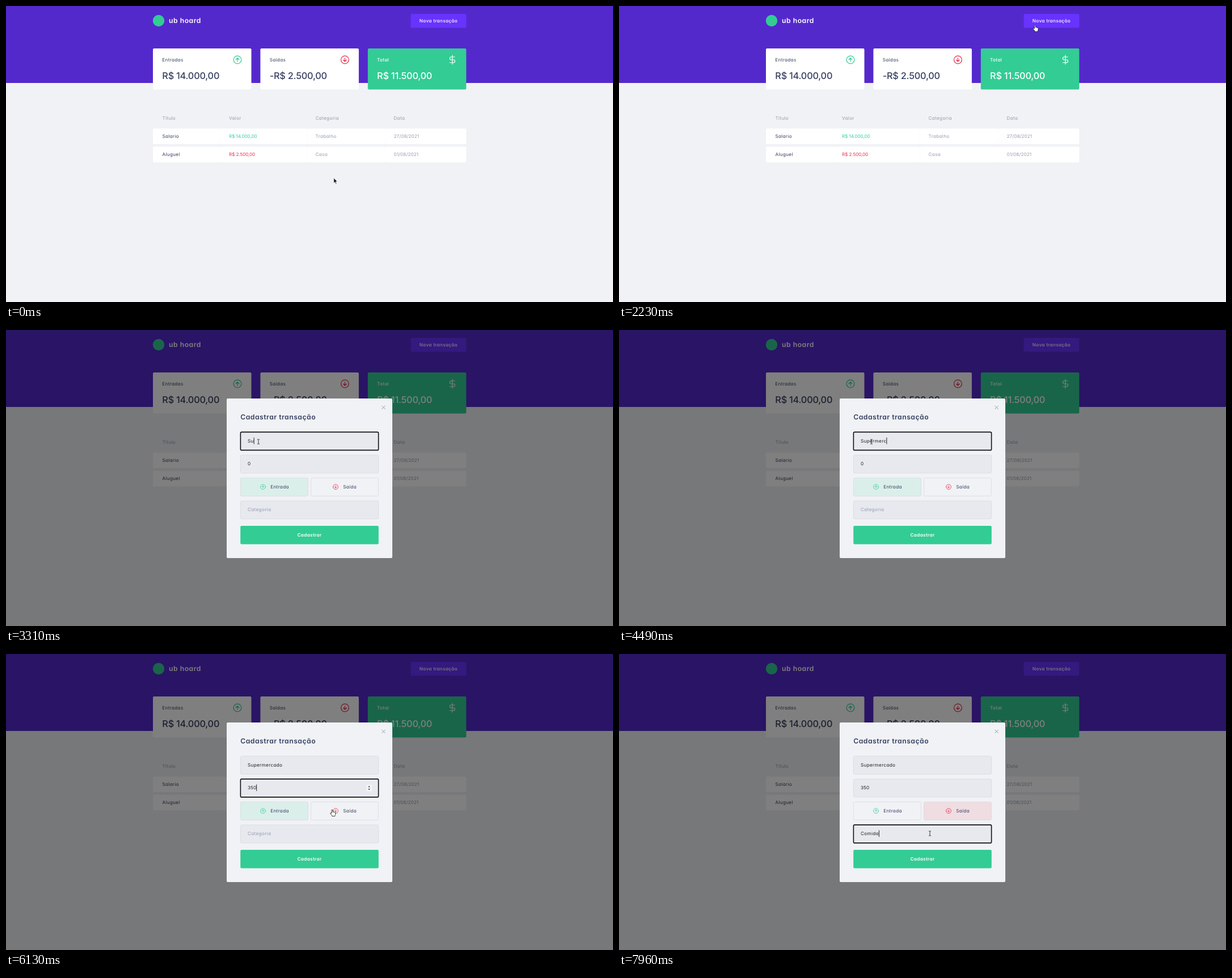
An HTML page that plays this animation: 1070x523 px, repeating every 8 s.

```html
<!DOCTYPE html>
<html lang="pt-BR">
<head>
<meta charset="utf-8">
<title>Finanças</title>
<style>
  html, body { margin: 0; width: 100%; height: 100%; overflow: hidden; background: #f0f2f5; }
  svg { display: block; }
  text {
    font: 400 8.13px Inter, "Open Sans", sans-serif;
    font-feature-settings: "cv11";
    letter-spacing: .042em;
    text-rendering: geometricPrecision;
    white-space: pre;
  }
  .num { letter-spacing: -.012em; }
  .date { letter-spacing: .01em; }
  .big { font-size: 16.25px; font-weight: 500; }
  .head { font-size: 12.19px; font-weight: 600; }
  .mid { font-weight: 500; }
  .bold { font-weight: 600; }
</style>
</head>
<body>
<svg id="stage" width="1070" height="523" viewBox="0 0 1070 523"></svg>
<script>
const LOOP = 8000;
const INK = '#363f5f', MUTED = '#969cb3', GREEN = '#33cc95', RED = '#e52e4d';
const PANEL = '#f0f2f5', FIELD = '#e7e9ee', BORDER = '#d7d7dc';
const stage = document.getElementById('stage');

function add(parent, tag, attrs) {
  const node = document.createElementNS('http://www.w3.org/2000/svg', tag);
  for (const key in attrs) node.setAttribute(key, attrs[key]);
  return parent.appendChild(node);
}
const group = (parent, attrs = {}) => add(parent, 'g', attrs);
const rect = (parent, x, y, width, height, fill, rx = 0, more = {}) =>
  add(parent, 'rect', { x, y, width, height, fill, rx, ...more });
function label(parent, x, y, content, fill, cls = '', anchor = 'start') {
  const node = add(parent, 'text', { x, y, fill, class: cls, 'text-anchor': anchor });
  node.textContent = content;
  return node;
}
const show = (node, visible) => node.setAttribute('visibility', visible ? 'inherit' : 'hidden');

function arrowIcon(parent, x, y, size, color, down) {
  const g = group(parent, {
    transform: `translate(${x} ${y}) scale(${size}) rotate(${down ? 180 : 0})`,
    fill: 'none', stroke: color, 'stroke-width': 1.25, 'stroke-linecap': 'round', 'stroke-linejoin': 'round'
  });
  add(g, 'circle', { r: 6.9 });
  add(g, 'path', { d: 'M0 3V-3M-2.9 -.2L0 -3L2.9 -.2' });
}

function drawPage() {
  rect(stage, 0, 0, 1070, 523, PANEL);
  rect(stage, 0, 0, 1070, 136, '#5429cc');
  add(stage, 'circle', { cx: 269, cy: 26, r: 10.2, fill: GREEN });
  label(stage, 287, 30.2, 'ub hoard', '#fff', 'head');
  rect(stage, 713.5, 14, 97.8, 24.5, '#6933ff', 2);
  label(stage, 762.4, 28.8, 'Nova transação', '#fff', 'mid', 'middle');

  [['Entradas', 'R$ 14.000,00'], ['Saídas', '-R$ 2.500,00'], ['Total', 'R$ 11.500,00']]
    .forEach(([name, amount], i) => {
      const x = 259 + i * 189.4, total = i === 2, color = total ? '#fff' : INK;
      rect(stage, x, 75, 173.5, 72.6, total ? GREEN : '#fff', 2);
      label(stage, x + 16.3, 97.7, name, color, total ? 'mid' : '');
      label(stage, x + 16.3, 129.3, amount, color, 'big num');
      if (!total) arrowIcon(stage, x + 149, 95, 1, i ? RED : GREEN, i === 1);
    });
  add(stage, 'path', {
    d: 'M786.8 87V103M791 90H784.8A2.5 2.5 0 0 0 784.8 95H788.8A2.5 2.5 0 0 1 788.8 100H782.3',
    fill: 'none', stroke: '#fff', 'stroke-width': 1.2, 'stroke-linecap': 'round'
  });

  const columns = [275.5, 393, 545.5, 683.5];
  const edges = [259, 377.8, 530.2, 668.2, 811.3];
  ['Título', 'Valor', 'Categoria', 'Data'].forEach((name, i) => label(stage, columns[i], 200.8, name, MUTED));
  [['Salario', 'R$ 14.000,00', 'Trabalho', '27/08/2021'], ['Aluguel', 'R$ 2.500,00', 'Casa', '01/08/2021']]
    .forEach((cells, row) => {
      const y = 216.4 + row * 32.1;
      const colors = [INK, row ? RED : GREEN, MUTED, MUTED];
      cells.forEach((content, i) => {
        rect(stage, edges[i], y, edges[i + 1] - edges[i], 27.7, '#fff', 2);
        label(stage, columns[i], y + 16.4, content, colors[i], ['', 'num', '', 'date'][i]);
      });
    });
}

const modal = group(stage);

function makeField(y, placeholder, cls = '') {
  const box = rect(modal, 413.4, y + .4, 243.2, 32, FIELD, 2);
  const hint = label(modal, 426, y + 18.6, placeholder, MUTED);
  const text = label(modal, 426, y + 18.6, '', '#222', cls);
  const caret = rect(modal, 426, y + 10, .9, 11.6, '#111');
  return {
    update(value, focused, caretVisible = focused) {
      box.setAttribute('stroke', focused ? '#101014' : BORDER);
      box.setAttribute('stroke-width', focused ? 1.6 : .7);
      text.textContent = value;
      show(hint, !value);
      show(caret, caretVisible);
      caret.setAttribute('x', 426 + (value ? text.getComputedTextLength() : 0));
    },
    text
  };
}

function makeChoice(x, name, color, down) {
  const box = rect(modal, x + .4, 261.4, 119, 32, color, 2, { stroke: BORDER, 'stroke-width': .7 });
  arrowIcon(modal, x + (down ? 44 : 40), 277.2, .64, color, down);
  label(modal, x + (down ? 57.2 : 53.2), 279.8, name, INK);
  return active => box.setAttribute('fill-opacity', active ? .11 : 0);
}

drawPage();
stage.appendChild(modal);
rect(modal, 0, 0, 1070, 523, '#000', 0, { opacity: .5 });
rect(modal, 389, 121, 292, 282, PANEL, 2);
add(modal, 'path', { d: 'M662.4 133.8L668.6 140M668.6 133.8L662.4 140', stroke: MUTED, 'stroke-width': 1 });
label(modal, 413.2, 158.4, 'Cadastrar transação', INK, 'head');
const titleField = makeField(180, 'Título');
const valueField = makeField(220.5, '', 'date');
const selection = rect(modal, 426, 230.4, 5.2, 12, '#0078d7');
modal.insertBefore(selection, valueField.text);
const spinner = group(modal);
rect(spinner, 635.2, 231, 10, 11.4, '#f3f3f5', 1);
add(spinner, 'path', { d: 'M638.3 235.3L640.1 233L641.9 235.3ZM638.3 238L640.1 240.3L641.9 238Z', fill: '#333' });
const setIncome = makeChoice(413, 'Entrada', GREEN, false);
const setExpense = makeChoice(537, 'Saída', RED, true);
const categoryField = makeField(301.5, 'Categoria');
rect(modal, 413.2, 346, 243.6, 32.6, GREEN, 2);
label(modal, 535, 364.8, 'Cadastrar', '#fff', 'bold', 'middle');

const cursor = group(stage);
const pointers = {
  arrow: add(cursor, 'path', {
    d: 'M0 0V9.2L2.1 7.3L3.6 10.6L5 10L3.6 6.8H6.3Z',
    fill: '#111', stroke: '#fff', 'stroke-width': .7, 'stroke-linejoin': 'round'
  }),
  hand: add(cursor, 'path', {
    d: 'M-1 6.6V.9Q0 -.5 1 .9V4.3Q2 3.5 2.8 4.6Q3.8 4 4.3 5Q5.5 4.6 5.7 6V8.4Q5.5 9.8 4.8 10.6V11.7H-.3V10.7L-3.3 7Q-3.4 5.4 -2 5.9Z',
    fill: '#fff', stroke: '#111', 'stroke-width': .8, 'stroke-linejoin': 'round'
  }),
  beam: add(cursor, 'path', {
    d: 'M-2 -4H-.6L0 -3.5L.6 -4H2M0 -3.5V3.5M-2 4H-.6L0 3.5L.6 4H2',
    fill: 'none', stroke: '#222', 'stroke-width': .9
  })
};

// Each move: start, end, destination x, destination y
const MOVES = [
  [1060, 1880, 709, 62],
  [1890, 2225, 733.3, 33.5],
  [2310, 2695, 449, 193],
  [2700, 2825, 445, 197.3],
  [5650, 6130, 577, 276],
  [6275, 6465, 548, 317],
  [7900, 7955, 548, 320.3]
];
const TICK = 1000 / 15, PHASE = 29;

function cursorAt(t) {
  const time = Math.floor((t - PHASE) / TICK) * TICK + PHASE;
  let x = 577.8, y = 303.8;
  for (const [start, end, toX, toY] of MOVES) {
    const p = Math.min(1, Math.max(0, (time - start) / (end - start)));
    const k = p * p * (3 - 2 * p);
    x += (toX - x) * k;
    y += (toY - y) * k;
  }
  return [x, y];
}

function pointerFor(x, y, open) {
  const within = (left, top, right, bottom) => x > left && x < right && y > top && y < bottom;
  if (!open) return within(713, 14, 811, 38.5) ? 'hand' : 'arrow';
  if (within(413, 261, 532.5, 293.5) || within(537, 261, 657, 293.5)) return 'hand';
  return [180, 220.5, 301.5].some(top => within(413, top, 657, top + 32.5)) ? 'beam' : 'arrow';
}

const KEYS = {
  Supermercado: [3030, 3310, 3490, 3560, 3630, 3690, 4220, 4290, 4490, 4560, 4700, 4770],
  350: [5120, 5190, 5250],
  Comida: [7010, 7150, 7280, 7420, 7490, 7560]
};
const typed = (word, t) => word.slice(0, KEYS[word].filter(at => t >= at).length);

function render(t) {
  const open = t >= 2300;
  const between = (from, to) => t >= from && t < to;
  show(modal, open);
  const [x, y] = cursorAt(t);
  cursor.setAttribute('transform', `translate(${x} ${y})`);
  const kind = pointerFor(x, y, open);
  for (const name in pointers) show(pointers[name], name === kind);

  if (!open) return;
  const selected = between(4900, 5120), valueFocus = between(4900, 6270), expense = t >= 6270;
  titleField.update(typed('Supermercado', t), between(2830, 4900));
  valueField.update(typed('350', t) || '0', valueFocus, valueFocus && !selected);
  valueField.text.setAttribute('fill', selected ? '#fff' : '#222');
  show(selection, selected);
  show(spinner, valueFocus);
  setIncome(!expense);
  setExpense(expense);
  categoryField.update(typed('Comida', t), t >= 6610);
}

const began = performance.now();
function frame() {
  render((performance.now() - began) % LOOP);
  requestAnimationFrame(frame);
}
render(0);
requestAnimationFrame(frame);
</script>
</body>
</html>
```
